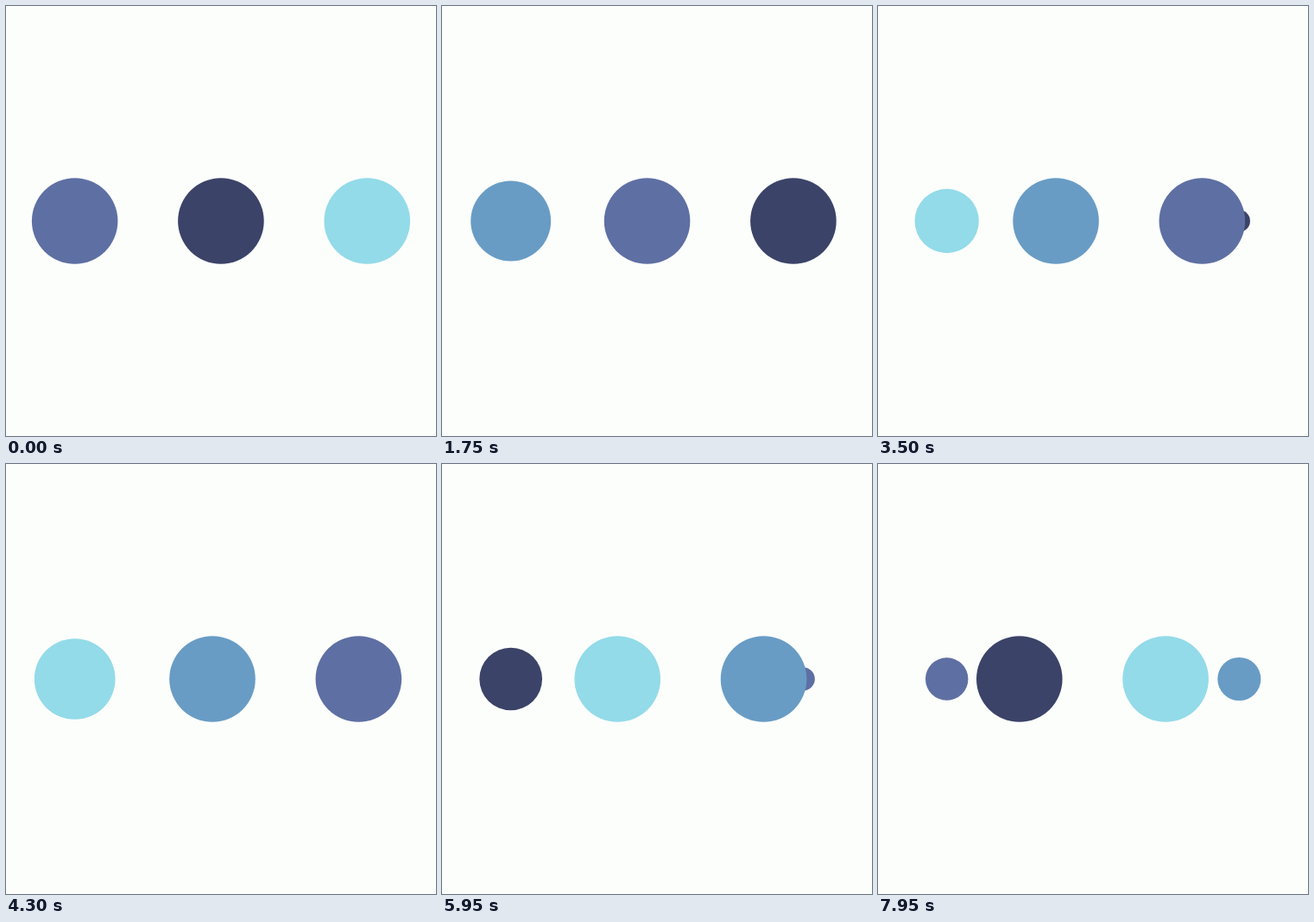
An HTML page that plays this animation: 498 by 498 pixels, repeating every 8000 ms.

```html
<!DOCTYPE html>
<html lang="en">
<head>
<meta charset="utf-8">
<title>Moving dots</title>
<style>
  html, body { margin: 0; height: 100%; overflow: hidden; background: #fcfefc; }
  svg { display: block; width: 100%; height: 100%; }
</style>
</head>
<body>
<svg viewBox="0 0 100 100">
  <circle cy="50"/><circle cy="50"/><circle cy="50"/><circle cy="50"/>
</svg>
<script>
const LOOP = 8000, STEP = 2497, START = 66;
const LEFT = 16, GAP = 34, RADIUS = 10;
const COLORS = ['#689cc5', '#93dbe9', '#3b4368', '#5e6fa3'];
const dots = document.querySelectorAll('circle');

// Closed form of cubic-bezier(0, .5, .5, 1)
function ease(x) {
  const t = 1 + 2 * Math.cos((Math.acos(1 - x) + 4 * Math.PI) / 3);
  return 1.5 * t - 0.5 * t ** 3;
}

function place(dot, column, size, color) {
  dot.setAttribute('cx', LEFT + GAP * column);
  dot.setAttribute('r', RADIUS * size);
  dot.setAttribute('fill', COLORS[(color + 8) % 4]);
}

function draw(time) {
  const phase = (time % LOOP - START) / STEP;
  const step = Math.floor(phase);
  const p = ease(phase - step);
  place(dots[0], 2, 1 - p, step - 3);
  place(dots[1], 0, p, step);
  place(dots[2], p, 1, step - 1);
  place(dots[3], 1 + p, 1, step - 2);
}

const begin = performance.now();
function tick() {
  draw(performance.now() - begin);
  requestAnimationFrame(tick);
}
tick();
</script>
</body>
</html>
```
